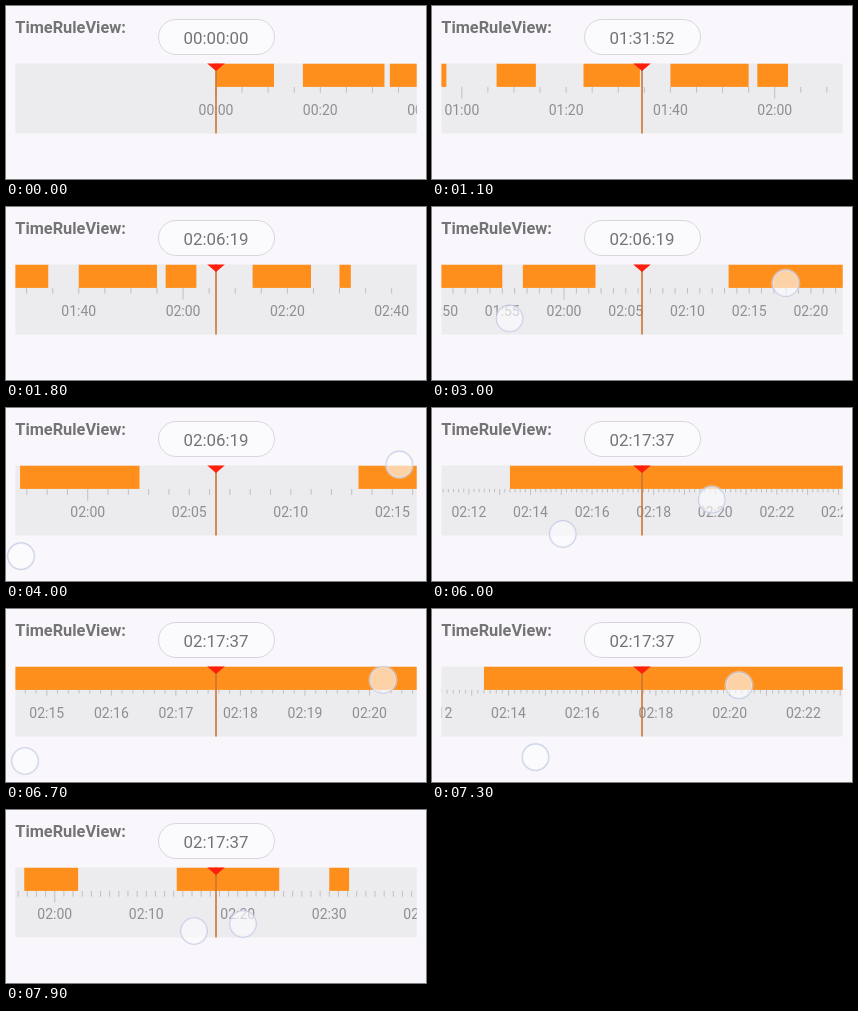
Write an HTML page with a canvas that moves like this. It is 420 px wide and 173 px high and loops after 8 s.

```html
<!DOCTYPE html>
<html lang="en">
<head>
<meta charset="utf-8">
<title>TimeRuleView</title>
<style>
  html, body { margin: 0; width: 100%; height: 100%; overflow: hidden; background: #f9f7fb; }
  body { position: relative; font-family: Roboto, "Liberation Sans", sans-serif; color: #747376; }
  canvas { position: absolute; left: 0; top: 0; width: 420px; height: 173px; }
  .title { position: absolute; left: 9.3px; top: 12px; font-size: 16.33px; line-height: 19px; font-weight: 700; white-space: nowrap; }
  .clock {
    position: absolute; left: 151.5px; top: 13px; width: 117px; height: 36px; box-sizing: border-box;
    border: 1px solid #d8d7dc; border-radius: 18px; background: #fbfafc;
    font-size: 16.9px; line-height: 36px; text-align: center; white-space: nowrap;
  }
</style>
</head>
<body>
<div class="title">TimeRuleView:</div>
<div class="clock" id="clock">00:00:00</div>
<canvas id="stage"></canvas>
<script>
const LOOP = 8000, STEP = 100;
const W = 420, H = 173, MID = 210;
const BAND = { x: 9.4, y: 57.5, w: 401.3, h: 70 };
const PART_HEIGHT = 23.4;
const BASE_ZOOM = 5.215; // px per minute

// Recorded parts start every 1000 s; these are their lengths in seconds.
const PARTS = [667, 938, 700, 422, 452, 649, 900, 353, 672, 130];

const easeOut = power => u => 1 - (1 - u) ** power;
const smooth = u => u * u * (3 - 2 * u);
const mix = (a, b, p) => a + (b - a) * p;

const FLING = { start: 691, end: 1800, ease: easeOut(3), to: 7579, lag: 19.13 };
const DRAG = { start: 4400, end: 5600, ease: easeOut(1.419), bend: 1, fingers: [[346.4, 100, 115.1, 112]] };

// Fingers move from x, y to x, y; bend curves the path, zoomBend delays the zoom.
const PINCHES = [
  { start: 2300, end: 4200, hold: 200, ease: easeOut(2.3), bend: 3, zoom: 20.46, zoomBend: 1.78,
    fingers: [[197, 97, 14, 149], [278, 84, 394, 56]] },
  { start: 5900, end: 6700, ease: easeOut(2), bend: 1, zoom: 64.55, zoomBend: 1,
    fingers: [[165, 118, 19, 152], [250, 98, 377, 71]] },
  { start: 6700, end: 7900, ease: smooth, bend: 3, zoom: 9.15, zoomBend: 1,
    fingers: [[19, 152, 188, 121], [377, 71, 237, 114]] }
];

const canvas = document.getElementById('stage');
const clock = document.getElementById('clock');
const ctx = canvas.getContext('2d');
const dpr = window.devicePixelRatio || 1;
canvas.width = Math.round(W * dpr);
canvas.height = Math.round(H * dpr);

const two = n => String(n).padStart(2, '0');
const hourMin = s => two(Math.floor(s / 3600)) + ':' + two(Math.floor(s / 60) % 60);

function progress(move, t) {
  const u = (t - move.start) / (move.end - move.start);
  return move.ease(Math.min(1, Math.max(0, u)));
}

function zoomAt(t) {
  return PINCHES.reduce((z, g) => mix(z, g.zoom, progress(g, t) ** g.zoomBend), BASE_ZOOM);
}

const flingTime = t => FLING.to * progress(FLING, t);

function centerTime(t) {
  const [x0, , x1] = DRAG.fingers[0];
  return flingTime(t) + (x0 - x1) * progress(DRAG, t) * 60 / PINCHES[0].zoom;
}

function drawRuler(now, zoom) {
  const toX = s => MID + (s - now) * zoom / 60;
  const labelStep = [60, 120, 300, 600].find(s => s * zoom / 60 >= 56) || 1200;
  const tickStep = labelStep > 600 ? 300 : labelStep > 120 ? 60 : 10;
  const half = 225 * 60 / zoom;
  const first = Math.max(0, Math.floor((now - half) / tickStep) * tickStep);
  const top = BAND.y + PART_HEIGHT;

  ctx.save();
  ctx.beginPath();
  ctx.rect(BAND.x, BAND.y, BAND.w, BAND.h);
  ctx.fillStyle = '#ecebee';
  ctx.fill();
  ctx.clip();

  ctx.font = '14px Roboto, "Liberation Sans", sans-serif';
  ctx.textAlign = 'center';
  for (let s = first; s <= now + half; s += tickStep) {
    const x = toX(s);
    const len = s % 3600 === 0 ? 11.7 : s % 60 === 0 ? 5.8 : 3.5;
    ctx.fillStyle = '#c0bfc2';
    ctx.fillRect(x - 0.5, top, 1, len);
    if (s % labelStep === 0) {
      ctx.fillStyle = '#8f8e91';
      ctx.fillText(hourMin(s), x, 109);
    }
  }

  ctx.fillStyle = '#ff8f1c';
  PARTS.forEach((len, i) => ctx.fillRect(toX(i * 1000), BAND.y, len * zoom / 60, PART_HEIGHT));
  ctx.restore();
}

function drawPointer() {
  ctx.fillStyle = '#ca7632';
  ctx.fillRect(MID - 0.8, BAND.y, 1.6, BAND.h);
  ctx.fillStyle = '#fb1f0c';
  ctx.beginPath();
  ctx.moveTo(MID - 8.75, BAND.y);
  ctx.lineTo(MID + 8.75, BAND.y);
  ctx.lineTo(MID, BAND.y + 7.6);
  ctx.fill();
}

function ring(x, y, r, width, color) {
  ctx.beginPath();
  ctx.arc(x, y, r, 0, Math.PI * 2);
  ctx.lineWidth = width;
  ctx.strokeStyle = color;
  ctx.stroke();
}

function drawTouch(x, y) {
  ring(x, y, 14.3, 1, 'rgba(236,234,242,0.4)');
  ring(x, y, 13, 1.7, 'rgba(188,198,224,0.8)');
  ctx.fillStyle = 'rgba(251,251,254,0.62)';
  ctx.fill();
}

function drawTouches(t) {
  // The flinging finger carries the ruler along.
  if (t >= 600 && t < 850) {
    drawTouch(345 - flingTime(t) * BASE_ZOOM / 60, 112 + (t - 600) / 50);
  }
  const g = [...PINCHES, DRAG].find(g => t >= g.start - (g.hold || 0) && t <= g.end);
  if (!g) return;
  const p = progress(g, t);
  for (const [x0, y0, x1, y1] of g.fingers) {
    drawTouch(mix(x0, x1, p), mix(y0, y1, p ** g.bend));
  }
}

function draw(t) {
  ctx.setTransform(dpr, 0, 0, dpr, 0, 0);
  ctx.clearRect(0, 0, W, H);
  drawRuler(centerTime(t), zoomAt(t));
  drawPointer();
  drawTouches(t);

  // The clock trails the ruler slightly during the fling.
  const s = Math.floor(centerTime(t < FLING.end ? t - FLING.lag : t));
  const text = hourMin(s) + ':' + two(s % 60);
  if (clock.textContent !== text) clock.textContent = text;
}

// The picture advances in steps of a tenth of a second.
function tick() {
  const t = (performance.now() + 16) % LOOP;
  draw(Math.floor(t / STEP) * STEP);
  requestAnimationFrame(tick);
}
tick();
</script>
</body>
</html>
```
